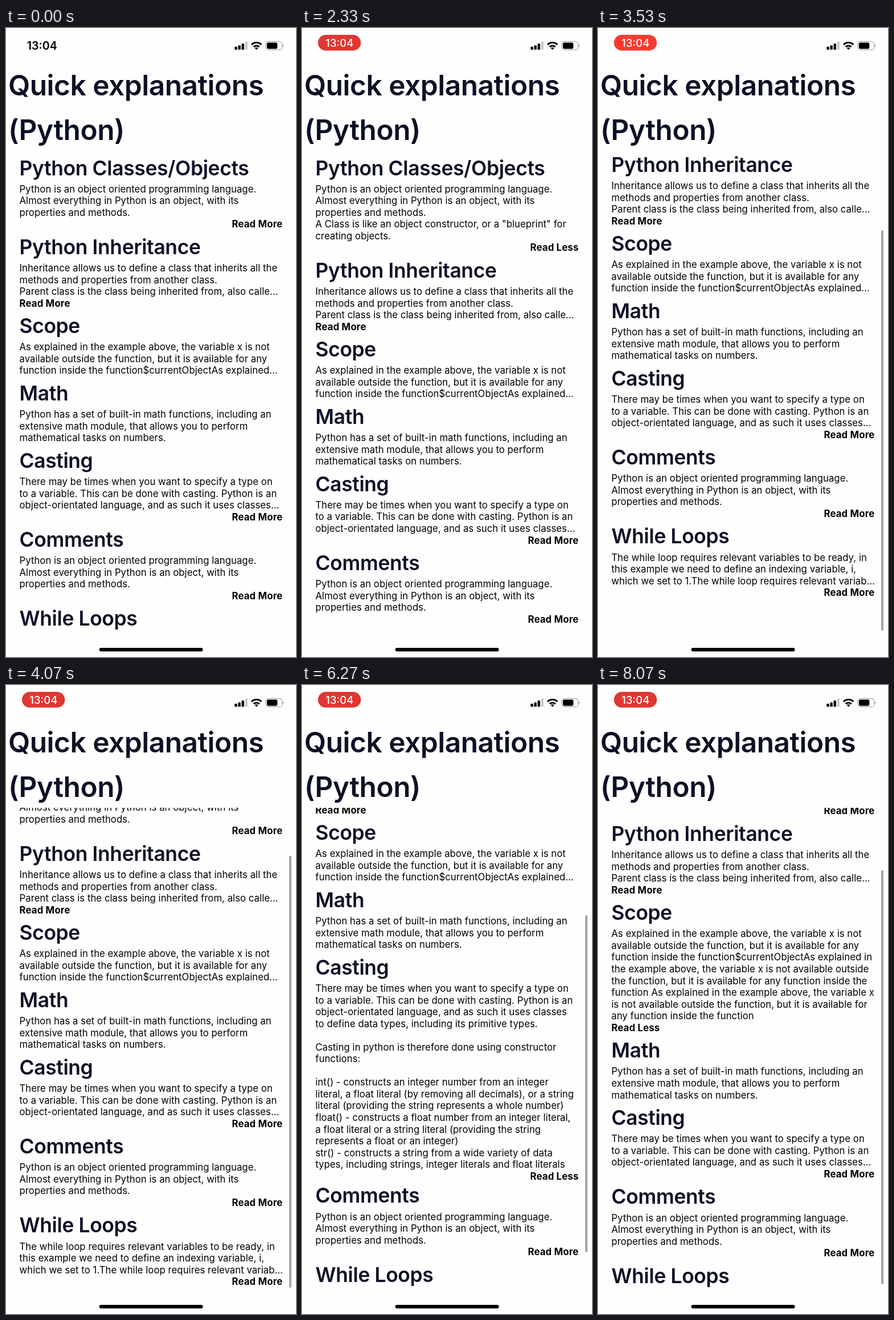
Write an HTML page that moves like this. It is 509x1101 px and loops after 8210 ms.

```html
<!DOCTYPE html>
<html lang="en">
<head>
<meta charset="utf-8">
<title>Quick explanations</title>
<style>
html, body { margin: 0; width: 100%; height: 100%; overflow: hidden; background: #fefefe; }
body { position: relative; font: 16.73px/20.54px Inter, sans-serif; letter-spacing: .04px; font-optical-sizing: none; color: #000; }
h1, h2 { margin: 0; font-weight: 600; letter-spacing: -.01em; color: #0d1126; white-space: pre; }
h1 { position: absolute; left: 3.9px; top: 60.5px; font-size: 49.6px; line-height: 78.5px; }
h2 { height: 56.2px; font-size: 35.4px; line-height: 59px; }
#view { position: absolute; left: 0; top: 215px; width: 509px; height: 844px; overflow: hidden; }
#list { padding: .5px 23.5px 0; }
.body { overflow: clip; overflow-clip-margin: 1.5px; white-space: pre; }
.link { font-weight: 700; letter-spacing: .2px; }
.right { text-align: right; }
#thumb { position: absolute; left: 496.5px; width: 4px; border-radius: 2px; background: #a6a6a6; }
svg { position: absolute; left: 0; top: 0; letter-spacing: 0; }
text { font-family: Inter, sans-serif; text-anchor: middle; }
</style>
</head>
<body>
<h1>Quick explanations
(Python)</h1>
<div id="view"><div id="list"></div></div>
<div id="thumb"></div>
<svg width="509" height="1101">
  <text id="clock" x="63.2" y="38" font-size="19.6" font-weight="600">13:04</text>
  <g id="pill">
    <rect id="pillBg" x="28" y="12" width="75.3" height="27.6" rx="13.8"/>
    <g id="rec">
      <circle cx="65.7" cy="26" r="8.4" fill="none" stroke="#fff" stroke-width="1.9"/>
      <circle cx="65.7" cy="26" r="4.2" fill="#fff"/>
    </g>
    <text id="pillTime" x="65.8" y="32.6" font-size="18.5" font-weight="500" fill="#fff">13:04</text>
  </g>
  <rect x="401.3" y="32.8" width="4.4" height="5.2" rx="1"/>
  <rect x="407.4" y="30.4" width="4.4" height="7.6" rx="1"/>
  <rect x="413.5" y="27.2" width="4.4" height="10.8" rx="1"/>
  <rect x="419.6" y="24" width="4.4" height="14" rx="1" fill="#ccc"/>
  <g fill="none" stroke="#000" stroke-width="3">
    <path d="M431 29.2a12.1 12.1 0 0 1 17.2 0"/>
    <path d="M434.5 33a7.2 7.2 0 0 1 10.2 0"/>
  </g>
  <path d="M439.6 38.3l-3-3.1a4.2 4.2 0 0 1 6 0z"/>
  <rect x="456" y="23.6" width="28.6" height="14.8" rx="4.5" fill="none" stroke="#aaa" stroke-width="1.2"/>
  <rect x="457.9" y="25.5" width="18.4" height="11" rx="2.8"/>
  <path d="M486 28.6q1.8 .6 1.8 2.4t-1.8 2.4z" fill="#aaa"/>
  <rect x="163.6" y="1085" width="182" height="6.2" rx="3.1"/>
</svg>
<script>
const LOOP = 8210, LINE = 20.54;
const $ = id => document.getElementById(id);
const oop = `Python is an object oriented programming language.
Almost everything in Python is an object, with its
properties and methods.`;

// link: side of the "Read More" line; full: expanded text; open: [expand start, end, collapse start, end]
const items = [
  { title: 'Python Classes/Objects', text: oop, link: 'right', open: [1290, 1610, 2320, 2620], side: 'right',
    full: oop + `
A Class is like an object constructor, or a "blueprint" for
creating objects.` },
  { title: 'Python Inheritance', link: 'left', text: `Inheritance allows us to define a class that inherits all the
methods and properties from another class.
Parent class is the class being inherited from, also calle…` },
  { title: 'Scope', open: [7450, 7750], side: 'left',
    text: `As explained in the example above, the variable x is not
available outside the function, but it is available for any
function inside the function$currentObjectAs explained…`,
    full: `As explained in the example above, the variable x is not
available outside the function, but it is available for any
function inside the function$currentObjectAs explained in
the example above, the variable x is not available outside
the function, but it is available for any function inside the
function As explained in the example above, the variable x
is not available outside the function, but it is available for
any function inside the function` },
  { title: 'Math', text: `Python has a set of built-in math functions, including an
extensive math module, that allows you to perform
mathematical tasks on numbers.` },
  { title: 'Casting', link: 'right', open: [4440, 4740, 6245, 6545], side: 'right',
    text: `There may be times when you want to specify a type on
to a variable. This can be done with casting. Python is an
object-orientated language, and as such it uses classes…`,
    full: `There may be times when you want to specify a type on
to a variable. This can be done with casting. Python is an
object-orientated language, and as such it uses classes
to define data types, including its primitive types.

Casting in python is therefore done using constructor
functions:

int() - constructs an integer number from an integer
literal, a float literal (by removing all decimals), or a string
literal (providing the string represents a whole number)
float() - constructs a float number from an integer literal,
a float literal or a string literal (providing the string
represents a float or an integer)
str() - constructs a string from a wide variety of data
types, including strings, integer literals and float literals` },
  { title: 'Comments', text: oop, link: 'right' },
  { title: 'While Loops', link: 'right', text: `The while loop requires relevant variables to be ready, in
this example we need to define an indexing variable, i,
which we set to 1.The while loop requires relevant variab…` }
];

const unit = (t, a, b) => Math.min(1, Math.max(0, (t - a) / (b - a)));
const smooth = (t, a, b) => { const u = unit(t, a, b); return u * u * (3 - 2 * u); };
const out = (t, a, b) => 1 - (1 - unit(t, a, b)) ** 3;

function add(parent, tag, cls, text) {
  const el = parent.appendChild(document.createElement(tag));
  el.className = cls;
  el.textContent = text;
  return el;
}

function fill(item, text, side, label) {
  item.el.textContent = '';
  add(item.el, 'div', '', text);
  if (side) add(item.el, 'div', 'link ' + side, label);
}

for (const item of items) {
  add($('list'), 'h2', '', item.title);
  item.el = add($('list'), 'div', 'body', '');
  item.short = (item.link ? 4 : 3) * LINE;
  item.tall = item.full ? (item.full.split('\n').length + 1) * LINE : item.short;
}

function drawItem(item, t) {
  const [a, b, c, d] = item.open || [LOOP, LOOP + 1];
  const p = smooth(t, a, b) - (c ? smooth(t, c, d) : 0);
  const opened = p > 0;
  if (item.opened !== opened) {
    item.opened = opened;
    if (opened) fill(item, item.full, item.side, 'Read Less');
    else fill(item, item.text, item.link, 'Read More');
  }
  item.el.style.height = item.short + (item.tall - item.short) * p + 'px';
}

function drawScroll(t) {
  const scroll = 143.7 * out(t, 3240, 3530) - 60 * out(t, 3710, 4330)
    + 179.3 * out(t, 5250, 6070) - 179.3 * smooth(t, 6270, 6730) + 39 * smooth(t, 7740, 8070);
  const content = 929 + (t >= 5260 ? 267 : 0) - 267 * smooth(t, 6270, 6730) + 46 * smooth(t, 7740, 8070);
  const track = 836, range = content - 845;
  const over = Math.max(0, scroll - range);
  const size = track * 845 / content;
  const top = 219 + Math.min(1, scroll / range) * (track - size) + over;
  $('list').style.transform = `translateY(${-scroll}px)`;
  const bar = $('thumb').style;
  bar.top = top + 'px';
  bar.height = size - over + 'px';
  bar.opacity = unit(t, 3240, 3330);
}

function drawStatus(t) {
  const shown = smooth(t, 850, 1130), swap = smooth(t, 1880, 2070);
  const beat = (t + 1000) % 2000;
  const dim = smooth(beat, 330, 1070) - smooth(beat, 1850, 2000);
  $('clock').style.opacity = 1 - shown;
  $('pill').style.opacity = shown;
  $('rec').style.opacity = 1 - swap;
  $('pillTime').style.opacity = swap;
  $('pillBg').style.fill = `rgb(${255 - 30 * dim},${59 - 5 * dim},${48 + dim})`;
}

function draw(now) {
  const t = now % LOOP;
  items.forEach(item => drawItem(item, t));
  drawScroll(t);
  drawStatus(t);
}

const start = performance.now();
function tick() {
  draw(performance.now() - start);
  requestAnimationFrame(tick);
}
tick();
</script>
</body>
</html>
```
